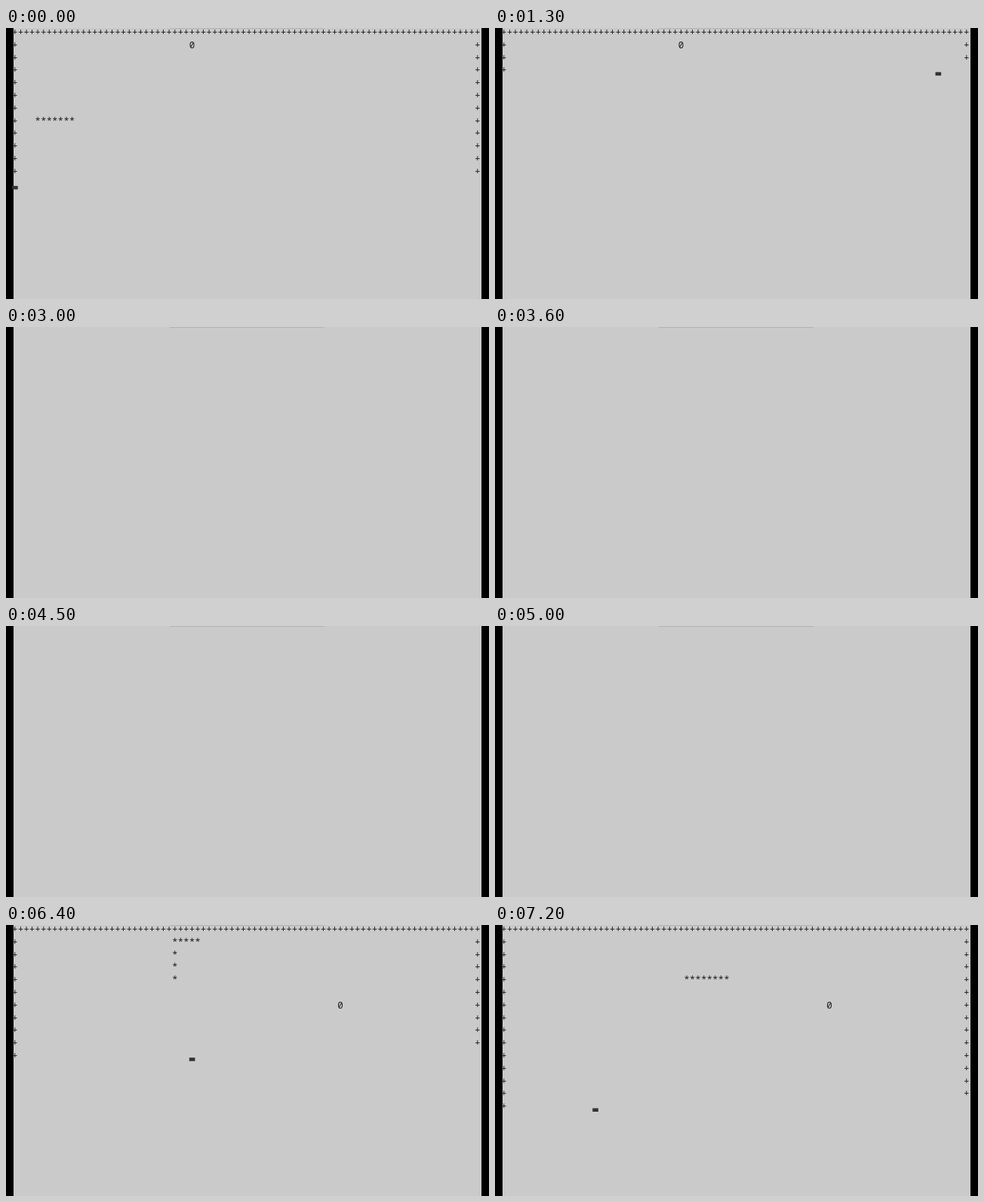
An HTML page for the animation above (7.3 s loop, 640 by 360 pixels).

```html
<!DOCTYPE html>
<html>
<head>
<meta charset="utf-8">
<style>
html, body { margin: 0; width: 100%; height: 100%; overflow: hidden; background: #000; }
svg { display: block; width: 100vw; height: 100vh; }
text { font-family: "Noto Sans Mono", monospace; font-size: 12.62px; white-space: pre; fill: #1c1c1c; }
</style>
</head>
<body>
<svg id="stage" viewBox="0 0 640 360">
  <rect width="640" height="360"/>
  <rect x="10" width="620" height="360" fill="#cacaca"/>
  <rect x="217" width="205" height="1" fill="#b2b2b2"/>
  <g id="rows"></g>
  <rect id="cursor" width="7.6" height="4.6" fill="#333"/>
</svg>
<script>
const COLS = 82, ROWS = 22, CELL_W = 7.572, CELL_H = 16.8, LEFT = 8.1, BASE = 9.9;
const STEP = 100, FRAMES = 73, CLEAR = 0.25, EATEN = 81;

const rowsEl = document.getElementById('rows');
const cursor = document.getElementById('cursor');
const lines = Array.from({ length: ROWS }, (_, r) => {
  const el = document.createElementNS('http://www.w3.org/2000/svg', 'text');
  el.setAttribute('x', LEFT);
  el.setAttribute('y', BASE + r * CELL_H);
  return rowsEl.appendChild(el);
});

// The snake's route: start at its tail, then runs of [dx, dy, cells], wrapping at the edges.
const route = [[11, 7]];
const runs = [[-1, 0, 29], [0, -1, 16], [-1, 0, 31], [0, -1, 11],
              [-1, 0, 4], [0, 1, 3], [1, 0, 13]];
for (const [dx, dy, n] of runs) {
  for (let i = 0; i < n; i++) {
    const [x, y] = route[route.length - 1];
    route.push([(x + dx + COLS - 1) % (COLS - 1), (y + dy + ROWS - 1) % (ROWS - 1)]);
  }
}
const HEAD = 7;

// Screen redraws completed by each tick; the fraction is how far the current one has got.
const pace = [[0, 0.659], [13, 18.384], [24, 33.313], [36, 49.12],
              [45, 61.2], [56, 76.474], [72, 98.734]];
function redraws(k) {
  let i = 1;
  while (i < pace.length - 1 && k > pace[i][0]) i++;
  const [k0, v0] = pace[i - 1], [k1, v1] = pace[i];
  return v0 + (v1 - v0) * (k - k0) / (k1 - k0);
}

function board(move) {
  const grid = Array.from({ length: ROWS }, (_, r) =>
    Array.from({ length: COLS }, (_, c) =>
      r === 0 || r === ROWS - 1 || c === 0 || c === COLS - 1 ? '+' : ' '));
  const ate = move >= EATEN;
  const [fx, fy] = ate ? [57, 6] : [31, 1];
  grid[fy][fx] = '0';
  const head = move + HEAD;
  for (const [x, y] of route.slice(head - (ate ? 7 : 6), head + 1)) grid[y][x] = '*';
  return grid;
}

function draw(k) {
  const v = redraws(k), move = Math.floor(v);
  const part = (v - move - CLEAR) / (1 - CLEAR);
  const count = Math.max(0, Math.round(part * COLS * ROWS));
  const grid = board(move);
  lines.forEach((el, r) => {
    const n = Math.min(COLS, Math.max(0, count - r * COLS));
    el.textContent = grid[r].slice(0, n).join('');
  });
  cursor.setAttribute('visibility', count ? 'visible' : 'hidden');
  cursor.setAttribute('x', LEFT + count % COLS * CELL_W);
  cursor.setAttribute('y', 8.2 + Math.floor(count / COLS) * CELL_H);
}

const start = performance.now();
let last = -1;
function tick() {
  const k = Math.floor(Math.max(0, performance.now() - start) / STEP) % FRAMES;
  if (k !== last) draw(last = k);
  requestAnimationFrame(tick);
}
tick();
</script>
</body>
</html>
```
